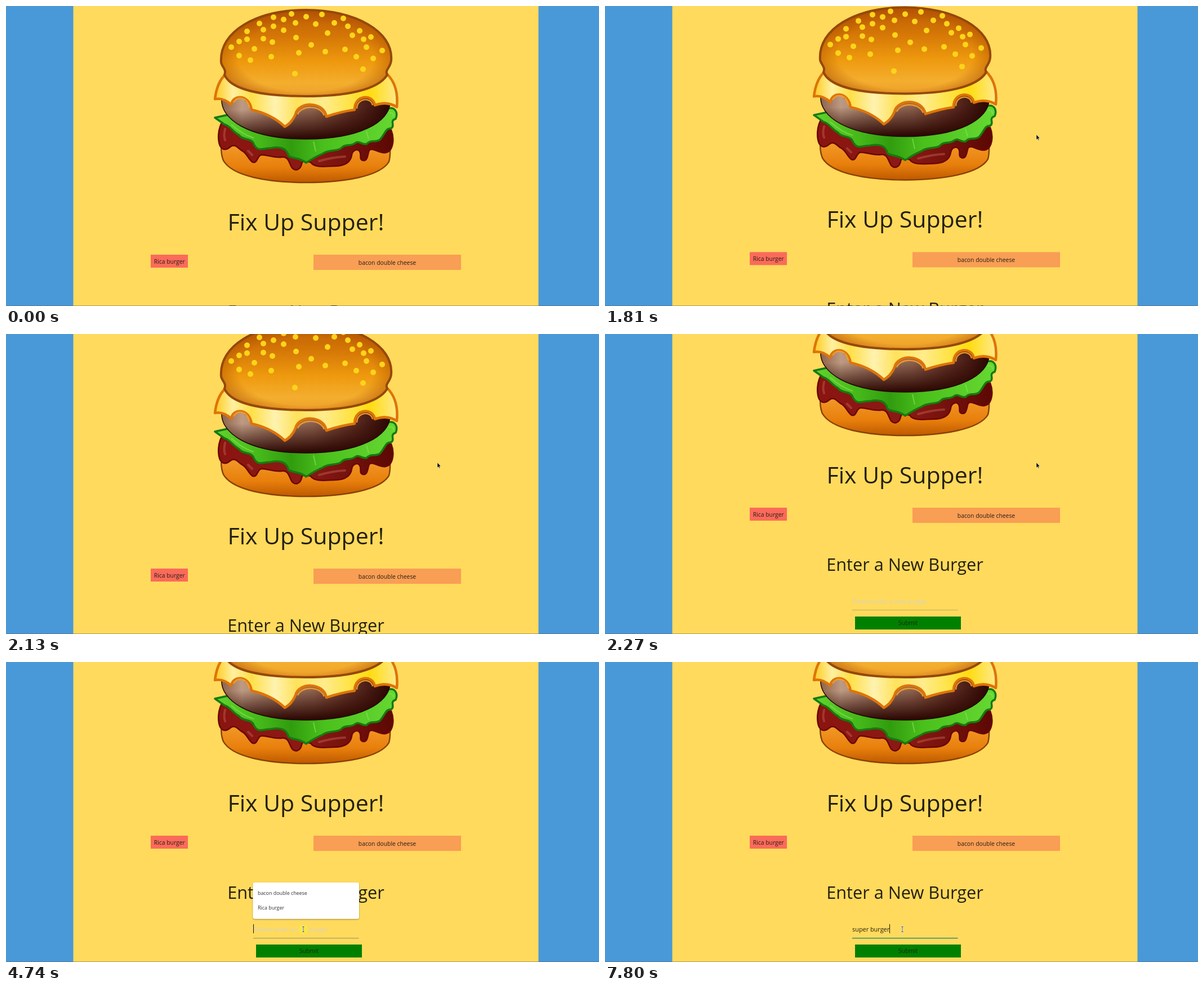
Write an HTML page that moves like this. It is 1053x532 px and loops after 8 s.

```html
<!DOCTYPE html>
<html lang="en">
<head>
<meta charset="utf-8">
<title>Burger page</title>
<style>
  html, body { margin: 0; height: 100%; overflow: hidden; background: #4998d8; }
  svg { display: block; width: 100%; height: 100%; }
  text { font-family: "Open Sans", "Noto Sans", sans-serif; font-size: 10.35px; fill: #241f12; white-space: pre; }
  .mid { text-anchor: middle; }
  .field { font-size: 10.9px; }
  .option { font-size: 8.9px; fill: #333; }
</style>
</head>
<body>
<svg viewBox="0 0 1053 532">
  <defs>
    <linearGradient id="bun" x2="0" y2="1">
      <stop stop-color="#be5c04"/><stop offset=".3" stop-color="#d47606"/>
      <stop offset=".6" stop-color="#ee990e"/><stop offset=".85" stop-color="#f4ae2e"/><stop offset="1" stop-color="#eda02a"/>
    </linearGradient>
    <radialGradient id="rim" cx=".5" cy=".55" r=".55">
      <stop offset=".72" stop-color="#a84a00" stop-opacity="0"/><stop offset="1" stop-color="#a84a00" stop-opacity=".6"/>
    </radialGradient>
    <linearGradient id="base" x2="0" y2="1">
      <stop offset=".25" stop-color="#f09422"/><stop offset=".65" stop-color="#e87f0c"/><stop offset="1" stop-color="#be5900"/>
    </linearGradient>
    <linearGradient id="cheese">
      <stop stop-color="#ffcb20"/><stop offset=".1" stop-color="#fff0a0"/><stop offset=".2" stop-color="#ffdf48"/>
      <stop offset=".33" stop-color="#fff2b0"/><stop offset=".45" stop-color="#ffe25a"/><stop offset=".6" stop-color="#ffec8c"/>
      <stop offset=".85" stop-color="#ffdc10"/><stop offset="1" stop-color="#ffe98a"/>
    </linearGradient>
    <linearGradient id="patty">
      <stop stop-color="#8d624b"/><stop offset=".12" stop-color="#bd9a82"/><stop offset=".3" stop-color="#a07a66"/>
      <stop offset=".55" stop-color="#906450"/><stop offset=".75" stop-color="#663428"/><stop offset="1" stop-color="#2c0502"/>
    </linearGradient>
    <linearGradient id="shade" x2=".08" y2="1">
      <stop offset=".4" stop-color="#2a0500" stop-opacity="0"/><stop offset="1" stop-color="#2a0500" stop-opacity=".95"/>
    </linearGradient>
    <linearGradient id="leaf">
      <stop stop-color="#62d22e"/><stop offset=".25" stop-color="#45b81a"/><stop offset=".42" stop-color="#319c0e"/>
      <stop offset=".6" stop-color="#4ac01c"/><stop offset="1" stop-color="#66d832"/>
    </linearGradient>
    <linearGradient id="sauce">
      <stop stop-color="#8a1410"/><stop offset=".5" stop-color="#8c1a14"/><stop offset="1" stop-color="#5c0804"/>
    </linearGradient>
    <filter id="shadow" x="-10%" y="-10%" width="120%" height="130%">
      <feDropShadow dx="0" dy="1" stdDeviation="1.2" flood-opacity=".45"/>
    </filter>
    <path id="pattyShape" d="M383 164C380 200 430 236 533 236C630 236 680 205 682 172L640 150H420Z"/>
    <path id="bunShape" d="M382 100C378 45 445 7 533 7C620 7 688 45 684 96C683 110 672 113 677 122C660 150 600 160 533 160C460 160 400 150 388 122C392 112 383 108 382 100Z"/>
  </defs>

  <rect width="1053" height="532" fill="#4998d8"/>
  <rect x="119.5" width="826" height="532" fill="#ffda5c"/>

  <g id="page">
    <g stroke-linejoin="round">
      <path fill="url(#base)" stroke="#8a4004" stroke-width="2.5" d="M383 235C382 250 381 262 386 274C402 302 465 313 533 313C600 313 665 302 680 276C684 262 681 250 682 235Z"/>
      <path fill="url(#sauce)" stroke="#6a0603" stroke-width="2.5" d="M386 202C375 218 376 238 380 248C385 257 392 255 398 250C406 243 412 252 418 256C428 260 430 272 438 277C447 280 446 264 454 264C465 264 478 270 490 268C502 266 503 280 508 287C514 294 523 290 525 280C526 272 535 276 541 277C548 288 570 284 582 284C600 284 612 278 614 264C615 256 624 252 628 258C632 264 626 272 634 274C643 275 642 262 645 256C652 250 662 262 674 260C688 258 690 235 684 220Z"/>
      <path fill="none" stroke="#b8544a" stroke-width="4" stroke-linecap="round" opacity=".55" d="M389 218Q386 230 389 238M430 257L437 264M556 275Q580 268 602 267"/>
      <path fill="url(#leaf)" stroke="#157a10" stroke-width="3.5" d="M371 198L394 193C430 220 620 230 678 182C690 178 697 188 692 200C680 204 692 212 684 217C674 216 674 226 664 237C655 243 648 236 640 245C630 246 628 238 620 243C612 250 602 243 594 253C585 258 572 254 562 262C552 266 545 270 533 278C520 268 512 272 502 266C498 251 486 249 470 252C455 252 448 260 440 245C436 233 420 239 414 229C402 223 398 212 388 210Z"/>
      <path fill="none" stroke="#86e656" stroke-width="2" opacity=".6" d="M400 210Q420 228 440 234M546 240L550 258M640 222L644 236M680 190Q688 188 688 196"/>
      <use href="#pattyShape" fill="url(#patty)"/>
      <use href="#pattyShape" fill="url(#shade)" stroke="#220400" stroke-width="1.5"/>
      <ellipse cx="429" cy="167" rx="5" ry="2.5" fill="#2a0a04"/>
      <path fill="url(#cheese)" stroke="#de7409" stroke-width="4.5" d="M390 121C378 132 373 148 371 165Q386 162 400 175C403 156 432 156 436 184Q472 192 495 214Q508 207 514 192C519 169 564 168 569 196Q596 187 619 184C618 157 652 155 655 176Q676 168 694 179C696 158 692 136 677 121Z"/>
      <path fill="none" stroke="#f3a02a" stroke-width="2.5" opacity=".9" d="M404 171C410 160 428 160 432 180M518 192C524 176 558 175 565 194M623 182C623 163 648 161 651 176"/>
      <use href="#bunShape" fill="url(#bun)"/>
      <use href="#bunShape" fill="url(#rim)" stroke="#96480a" stroke-width="4"/>
      <g id="seeds" fill="#fdd41a"></g>
    </g>

    <text class="mid" x="532.5" y="398" style="font-size:41px">Fix Up Supper!</text>
    <rect x="257" y="441" width="66" height="23" fill="#fb6a5a"/>
    <text class="mid" x="290.3" y="457">Rica burger</text>
    <rect x="546" y="441" width="262" height="27" fill="#f99e55"/>
    <text class="mid" x="677" y="459">bacon double cheese</text>

    <text class="mid" x="532.5" y="552.5" style="font-size:30.7px">Enter a New Burger</text>
    <text class="field" id="hint" x="439" y="610.5" style="fill:#d6d3c8">Please enter a new burger</text>
    <text class="field" id="typed" x="439" y="610.5"></text>
    <rect id="line" x="439" y="622" width="187.5" height="1"/>
    <rect id="caret" y="598" width="1" height="16" fill="#111"/>
    <rect x="444" y="634" width="188" height="23" fill="#008000"/>
    <text class="mid" x="538" y="649">Submit</text>
  </g>

  <g id="menu">
    <rect x="438.5" y="391" width="188.5" height="64.5" rx="3" fill="#fff" filter="url(#shadow)"/>
    <text class="option" x="447" y="413">bacon double cheese</text>
    <text class="option" x="447" y="439">Rica burger</text>
  </g>
  <circle id="halo" cx="528" cy="474" r="8" fill="#fbea35" opacity=".88"/>
  <path id="arrow" d="M0 0V9.2L2.1 7.3L3.5 10.2L4.8 9.6L3.5 6.7H6.2Z" stroke="#fff" stroke-width=".5"/>
  <g id="beam" fill="none">
    <path d="M-2.5 -4.5H2.5M0 -4.5V4.5M-2.5 4.5H2.5" stroke="#fff" stroke-width="2.2"/>
    <path d="M-2 -4.5H2M0 -4.5V4.5M-2 4.5H2" stroke="#555" stroke-width="1"/>
  </g>
  <rect y="531" width="1053" height="1" fill="#555" opacity=".45"/>
</svg>

<script>
const LOOP = 8000;
const $ = id => document.getElementById(id);
const show = (id, on) => { $(id).style.display = on ? '' : 'none'; };

const seeds = [
  [507, 14], [533, 19], [561, 15], [475, 20], [493, 24], [599, 22], [450, 31], [514, 30],
  [550, 32], [583, 30], [607, 36], [475, 36], [457, 42], [493, 43], [428, 45], [571, 48],
  [628, 44], [615, 52], [648, 55], [515, 56], [414, 63], [428, 59], [457, 58], [473, 64],
  [635, 59], [542, 69], [400, 73], [441, 76], [640, 73], [668, 79], [520, 83], [567, 81],
  [602, 77], [414, 88], [471, 90], [434, 96], [622, 90], [652, 93], [634, 112], [513, 120]
];
$('seeds').innerHTML = seeds.map(([x, y]) => `<circle cx="${x}" cy="${y}" r="5"/>`).join('');

// [time, scroll offset], held until the next entry
const scrolls = [[0, 0], [1810, 4.6], [1890, 10], [1970, 17], [2050, 22], [2130, 25], [2190, 80], [2270, 133]];
const phrase = 'super burger';
const keyTimes = [5070, 5260, 5480, 5630, 5780, 5940, 7100, 7180, 7410, 7560, 7730, 7800];

// Pointer moves: start and end time, number of held positions, end points
const moves = [
  { start: 490, end: 650, steps: 3, from: [853, 357], to: [766, 228] },
  { start: 2900, end: 3670, steps: 11, from: [766, 228], to: [548, 463] },
  { start: 3740, end: 4130, steps: 6, from: [548, 463], to: [528, 474] }
];

function pointerAt(t) {
  const index = moves.findLastIndex(m => t >= m.start);
  if (index < 0) return null;
  const { start, end, steps, from, to } = moves[index];
  const step = Math.floor((t - start) / (end - start) * (steps - 1) + 1e-6);
  const p = index ? Math.min(1, (step + 1) / steps) : Math.min(1, step / (steps - 1));
  const eased = p * p * (3 - 2 * p);
  return from.map((v, i) => v + (to[i] - v) * eased);
}

function lineColor(t) {
  const p = Math.min(1, Math.max(0, (t - 4700) / 370));
  const mix = [190, 170, 105].map((v, i) => Math.round(v + ([38, 140, 110][i] - v) * p));
  return `rgb(${mix})`;
}

function draw(t) {
  const scroll = scrolls.findLast(s => t >= s[0])[1];
  $('page').setAttribute('transform', `translate(0 ${-scroll})`);

  const count = keyTimes.filter(k => t >= k).length;
  $('typed').textContent = phrase.slice(0, count);
  show('hint', count === 0);
  show('menu', t >= 4740 && t < 5070);
  show('halo', t >= 4740 && t < 4910);

  const width = count ? $('typed').getComputedTextLength() : 0;
  $('caret').setAttribute('x', Math.round(439 + width));
  show('caret', t >= 4740 && !(t >= 6490 && t < 7020));
  $('line').setAttribute('fill', lineColor(t));
  $('line').setAttribute('height', t >= 4740 ? 1.4 : 1);

  const pointer = pointerAt(t);
  const overField = pointer && t > 2900 && pointer[1] > 455;
  show('arrow', pointer && !overField);
  show('beam', overField);
  if (pointer) $(overField ? 'beam' : 'arrow').setAttribute('transform', `translate(${pointer})`);
}

const origin = performance.now();
function tick() {
  draw((performance.now() - origin) % LOOP);
  requestAnimationFrame(tick);
}
tick();
</script>
</body>
</html>
```
